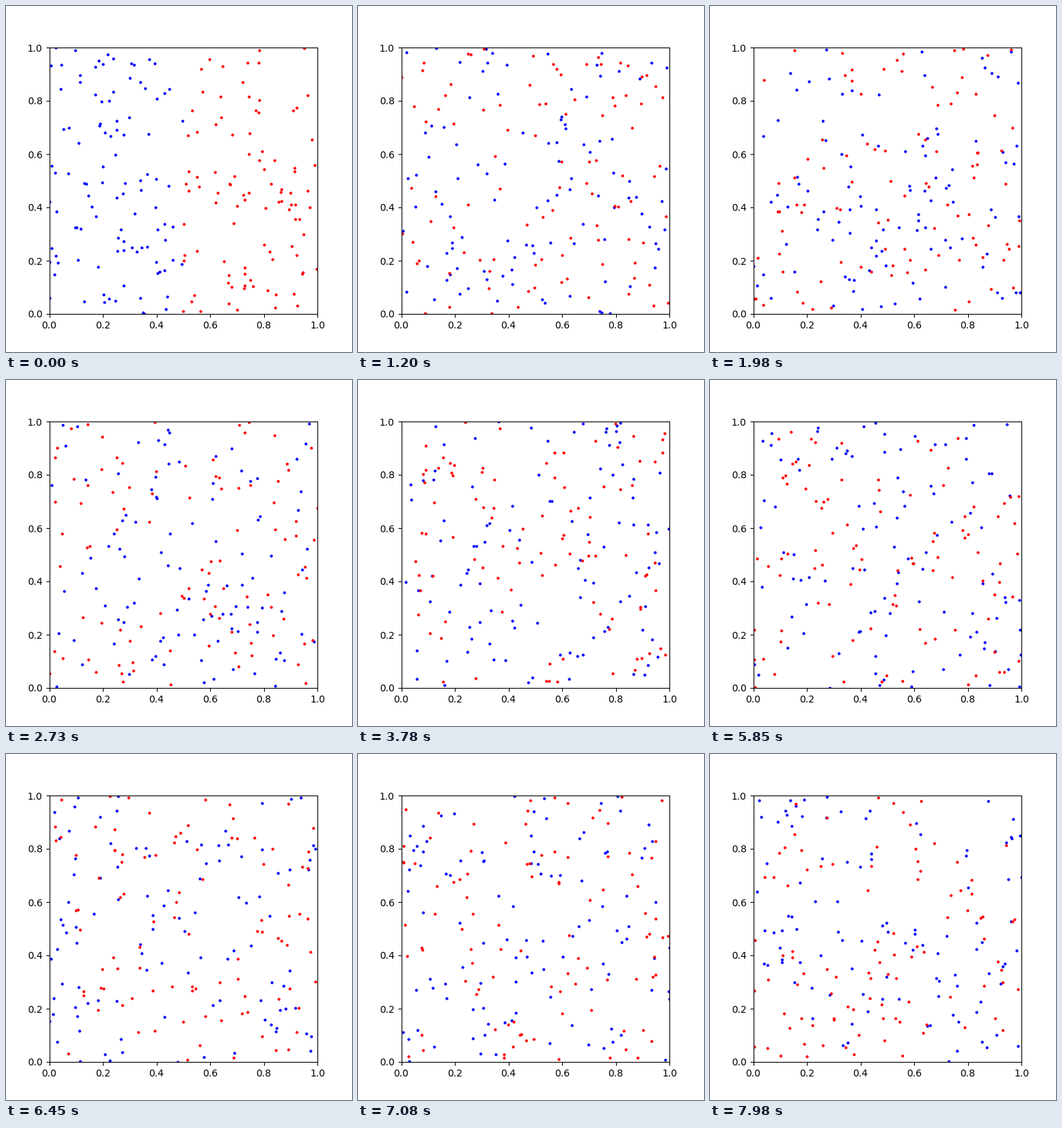
A matplotlib script for the animation above (8000 ms loop, 500 px wide and 500 px high).

```python
import numpy as np
import matplotlib.pyplot as plt
from matplotlib.animation import FuncAnimation

LOOP, TICK, STEP = 8000, 20, 30   # ms: loop, drawing tick, simulation step
N_BLUE, N_RED = 103, 97
SPEED = 0.028                     # typical travel per step and axis

rng = np.random.default_rng(5)


def gas(count, left):
    """Random starts in one half of the box, with random velocities."""
    start = rng.random((count, 2)) * [0.5, 1] + [left, 0]
    return start, rng.normal(0, SPEED, (count, 2))


def bounce(pos):
    """Fold free flight back into the unit box (elastic walls)."""
    return 1 - np.abs(1 - pos % 2)


fig, ax = plt.subplots(figsize=(5, 5), dpi=100)
ax.set_xlim(0, 1)
ax.set_ylim(0, 1)

gases = [gas(N_BLUE, 0), gas(N_RED, 0.5)]
dots = [ax.plot([], [], "o", color=c, ms=2)[0] for c in ("blue", "red")]


def update(i):
    step = i * TICK // STEP
    for dot, (start, vel) in zip(dots, gases):
        dot.set_data(*bounce(start + vel * step).T)
    return dots


anim = FuncAnimation(fig, update, frames=LOOP // TICK, interval=TICK,
                     init_func=lambda: update(0), repeat=True, repeat_delay=0)
plt.show()
```
